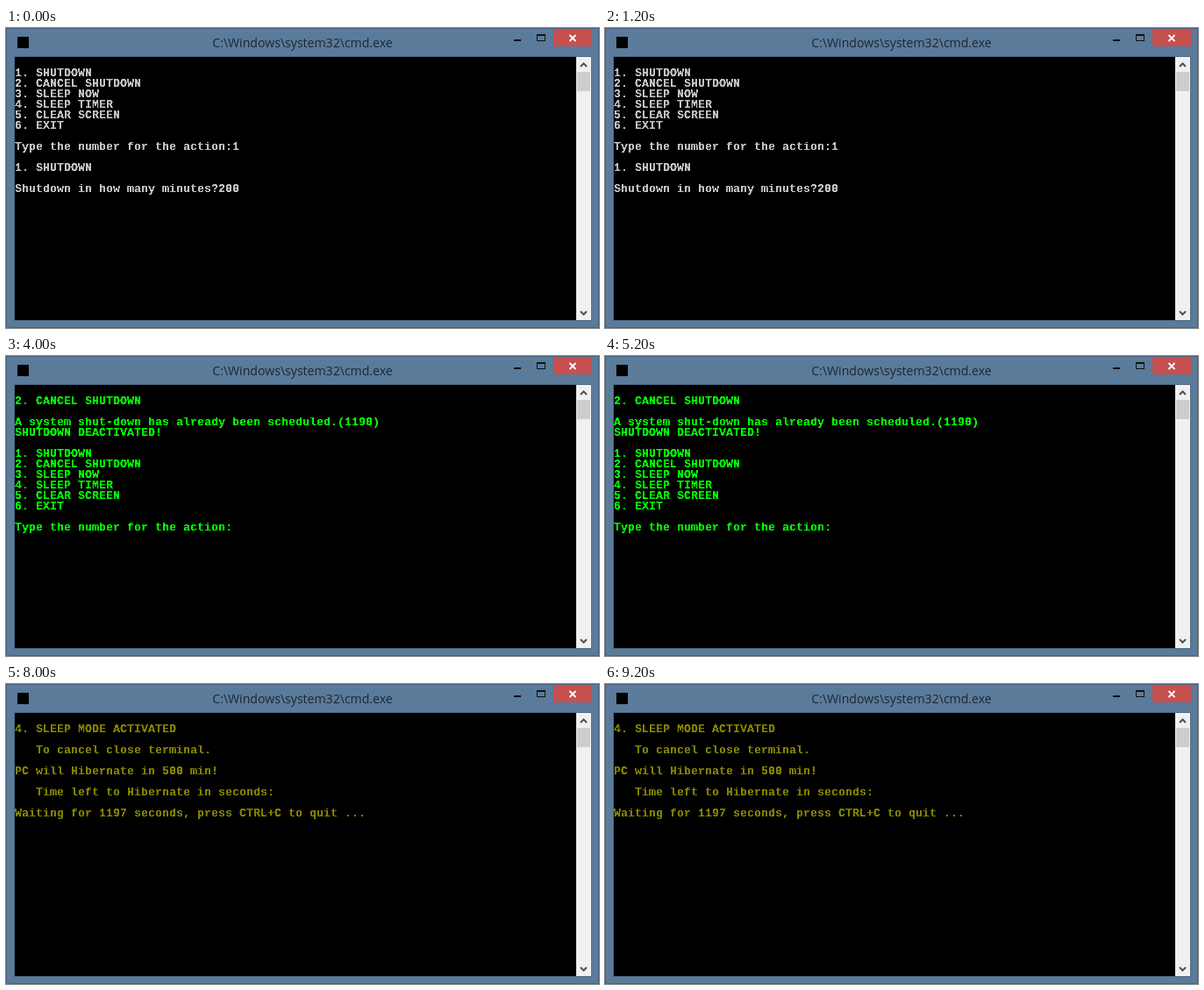
Write an HTML page that moves like this. It is 676 by 342 pixels and loops after 10 s.

```html
<!DOCTYPE html>
<html lang="en">
<head>
<meta charset="utf-8">
<title>Shutdown menu</title>
<style>
  html, body { margin: 0; width: 100%; height: 100%; overflow: hidden; background: #5b7b9b; }
  svg { display: block; }
  .title { font: 14.1px "Open Sans", "Noto Sans", sans-serif; fill: #1b2733; }
  #screen { filter: url(#crisp); }
  #screen text { font: bold 13.33px "Liberation Mono", "DejaVu Sans Mono", monospace; white-space: pre; }
</style>
</head>
<body>
<svg width="676" height="342" viewBox="0 0 676 342">
  <filter id="crisp" filterUnits="userSpaceOnUse" x="10" y="33" width="640" height="300" color-interpolation-filters="sRGB">
    <feComponentTransfer><feFuncA type="linear" slope="4" intercept="-1.2"/></feComponentTransfer>
  </filter>

  <!-- window frame -->
  <rect width="676" height="342" fill="#5b7b9b"/>
  <rect x=".5" y=".5" width="675" height="341" fill="none" stroke="#496380"/>
  <rect x="9.5" y="32.5" width="658" height="301" fill="#000" stroke="#4f6b87"/>
  <rect x="13" y="10" width="13" height="13" fill="#000"/>
  <text class="title" x="338" y="22" text-anchor="middle">C:\Windows\system32\cmd.exe</text>

  <!-- window buttons -->
  <rect x="579" y="13" width="8" height="2" fill="#111"/>
  <path d="M605 7h10v8h-10zM606 9v5h8v-5z" fill="#111" fill-rule="evenodd"/>
  <rect x="624" y="1" width="44" height="20" fill="#c75050"/>
  <path d="M642.5 8l7 7M649.5 8l-7 7" stroke="#fff" stroke-width="1.8"/>

  <!-- scroll bar -->
  <rect x="650" y="33" width="17" height="300" fill="#f0f0f0"/>
  <rect x="651" y="50" width="15" height="22" fill="#cdcdcd"/>
  <path d="M655 44l3.5-3.5 3.5 3.5M655 323l3.5 3.5 3.5-3.5" fill="none" stroke="#505050" stroke-width="2"/>

  <g id="screen"></g>
</svg>
<script>
const HOLD = 2000, LEFT = 10, TOP = 33, ROW = 12, BASE = 10;

const menu = ["1. SHUTDOWN", "2. CANCEL SHUTDOWN", "3. SLEEP NOW",
              "4. SLEEP TIMER", "5. CLEAR SCREEN", "6. EXIT", ""];
const prompt = "Type the number for the action:";
const gap = n => " ".repeat(n);

const scenes = [
  { color: "#c0c0c0", lines: [...menu, prompt + "1", "", "1. SHUTDOWN", "",
      "Shutdown in how many minutes?200"] },
  { color: "#ff0000", lines: ["PC will SHUTDOWN in 500 min [8hrs" + gap(7) + "20min]!",
      gap(6) + "`shutdown.exe /s /f /t 30000`", "", "TO CANCEL PRESS 2", "", ...menu, prompt] },
  { color: "#00ff00", lines: ["2. CANCEL SHUTDOWN", "",
      "A system shut-down has already been scheduled.(1190)",
      "SHUTDOWN DEACTIVATED!", "", ...menu, prompt] },
  { color: "#c0c0c0", lines: [...menu, prompt + "4", "", "Hibernate in how many minutes: 20"] },
  { color: "#808000", lines: ["4. SLEEP MODE ACTIVATED", "", gap(3) + "To cancel close terminal.", "",
      "PC will Hibernate in 500 min!", "", gap(3) + "Time left to Hibernate in seconds:", "",
      "Waiting for 1197 seconds, press CTRL+C to quit ..."] }
];

const screen = document.getElementById("screen");
const svgNode = name => document.createElementNS("http://www.w3.org/2000/svg", name);

function buildScene({ color, lines }) {
  const group = svgNode("g");
  group.setAttribute("fill", color);
  lines.forEach((line, i) => {
    if (!line) return;
    const indent = line.length - line.trimStart().length;
    const text = svgNode("text");
    text.setAttribute("x", LEFT + indent * 8);
    text.setAttribute("y", TOP + (i + 1) * ROW + BASE);
    text.textContent = line.trimStart();
    group.append(text);
  });
  screen.append(group);
  return group;
}

const groups = scenes.map(buildScene);
const start = performance.now();
let shown = -1;

function draw() {
  const now = Math.floor((performance.now() - start) / HOLD) % groups.length;
  if (now !== shown) {
    groups.forEach((g, i) => g.style.display = i === now ? "" : "none");
    shown = now;
  }
  requestAnimationFrame(draw);
}
draw();
</script>
</body>
</html>
```
